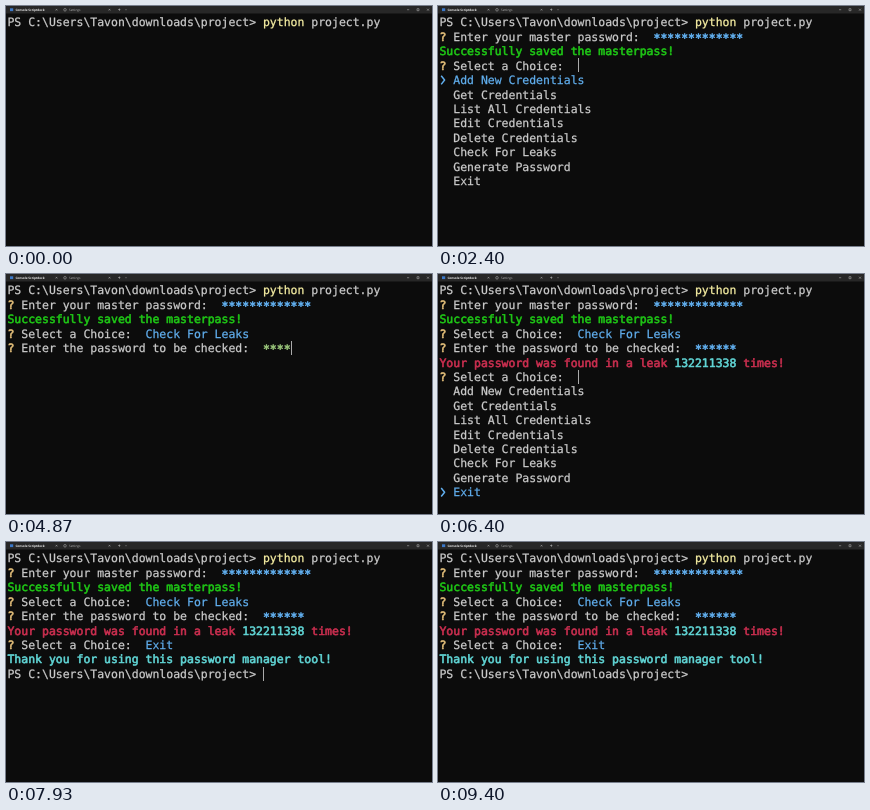
These frames come from a looping animation (426x240 px, 9.47 s). An HTML page with a canvas:

```html
<!DOCTYPE html>
<html>
<head>
<meta charset="utf-8">
<title>Password manager session</title>
<style>
  html, body { margin: 0; width: 100%; height: 100%; overflow: hidden; background: #0c0c0c; }
  canvas { display: block; width: 426px; height: 240px; }
</style>
</head>
<body>
<canvas id="stage"></canvas>
<script>
const LOOP = 9470, BLINK = 530;
const CELL = 6.905, LINE = 14.42, LEFT = 1.45, BASE = 20.4;
const MEDIUM = 0.25, BOLD = 0.6;
const WHITE = '#cccccc', YELLOW = '#f9f1a5', GOLD = '#e5c07b', BLUE = '#61afef',
      LIME = '#98c379', GREEN = '#1fc816', RED = '#cc2f50', CYAN = '#61d6d6';
const PROMPT = 'PS C:\\Users\\Tavon\\downloads\\project> ';
const MENU = ['Add New Credentials', 'Get Credentials', 'List All Credentials', 'Edit Credentials',
              'Delete Credentials', 'Check For Leaks', 'Generate Password', 'Exit'];

const canvas = document.getElementById('stage');
const ctx = canvas.getContext('2d');
const ratio = window.devicePixelRatio || 1;
canvas.width = 426 * ratio;
canvas.height = 240 * ratio;
ctx.scale(ratio, ratio);
ctx.lineJoin = 'round';
ctx.textRendering = 'geometricPrecision';

// Session times in ms; each one restarts the cursor blink.
const at = { start: 200, run: 670, ask: 1200, master: 1600, saved: 2200, menu: 2270, down: 2670,
             leaks: 3300, check: 4460, submit: 5270, result: 5800, up: 6130, exit: 7600, done: 7800 };
const MASTER_STEP = 40, DOWN_STEP = 130, CHECK_STEP = 133;
const repeat = (start, step, n) => Array.from({ length: n }, (_, i) => start + i * step);
const resets = [...Object.values(at), ...repeat(at.master, MASTER_STEP, 13),
                ...repeat(at.down, DOWN_STEP, 5), ...repeat(at.check, CHECK_STEP, 6)];

const count = (t, start, step, max) =>
  Math.max(0, Math.min(max, Math.floor((t - start) / step) + 1));

// A thin outline in the text colour sets the weight.
function write(row, col, color, text, weight = MEDIUM) {
  ctx.fillStyle = ctx.strokeStyle = color;
  ctx.lineWidth = weight;
  [...text].forEach((ch, i) => {
    const x = LEFT + (col + i) * CELL;
    const y = BASE + row * LINE + (ch === '*' ? 1 : 0);
    ctx.fillText(ch, x, y);
    ctx.strokeText(ch, x, y);
  });
}

function question(row, text, color = BLUE, answer = '') {
  write(row, 0, GOLD, '?', BOLD);
  write(row, 2, WHITE, text);
  write(row, text.length + 4, color, answer, answer[0] === '*' ? BOLD : MEDIUM);
}

function menu(row, selected) {
  question(row, 'Select a Choice:');
  MENU.forEach((item, i) => write(row + 1 + i, 2, i === selected ? BLUE : WHITE, item));
  const y = BASE - 4 + (row + 1 + selected) * LINE;
  ctx.strokeStyle = BLUE;
  ctx.lineWidth = 1.5;
  ctx.beginPath();
  ctx.moveTo(3.2, y - 4.3);
  ctx.lineTo(6.6, y);
  ctx.lineTo(3.2, y + 4.3);
  ctx.stroke();
}

function titleBar() {
  const box = (color, ...r) => { ctx.fillStyle = color; ctx.fillRect(...r); };
  const label = (text, x, weight, color) => {
    ctx.font = weight + ' 3.1px "Open Sans", sans-serif';
    ctx.fillStyle = color;
    ctx.fillText(text, x, 4.8);
  };
  const cross = (x, r) => {
    ctx.beginPath();
    ctx.moveTo(x - r, 3.7 - r); ctx.lineTo(x + r, 3.7 + r);
    ctx.moveTo(x + r, 3.7 - r); ctx.lineTo(x - r, 3.7 + r);
    ctx.stroke();
  };
  box('#272727', 0, 0, 426, 7.5);
  box('#3b78c8', 4, 2.3, 3.2, 2.8);
  label('Console Scriptdeck', 9.4, 700, '#eeeeee');
  label('Settings', 63, 400, '#bbbbbb');
  ctx.strokeStyle = '#bbbbbb';
  ctx.lineWidth = 0.5;
  ctx.beginPath();
  ctx.arc(59, 3.8, 1.3, 0, 7);
  ctx.stroke();
  cross(50.5, 0.8);
  cross(103.5, 0.8);
  cross(422, 1);
  ctx.strokeRect(411, 2.7, 2, 2);
  box('#bbbbbb', 401, 3.6, 2.2, 0.5);
  box('#bbbbbb', 112, 3.5, 2.4, 0.5);
  box('#bbbbbb', 113, 2.5, 0.5, 2.4);
  box('#999999', 119.2, 3.6, 1.6, 0.5);
}

function cursor(t, row, col) {
  const last = Math.max(...resets.filter(k => k <= t));
  if (t < at.start || (t - last) % (2 * BLINK) >= BLINK) return;
  ctx.fillStyle = '#aaaaaa';
  ctx.fillRect(Math.round(LEFT + col * CELL), Math.round(9.2 + row * LINE), 1, 14);
}

function draw(t) {
  ctx.fillStyle = '#0c0c0c';
  ctx.fillRect(0, 0, 426, 240);
  titleBar();
  ctx.font = '11.47px "DejaVu Sans Mono", monospace';

  let caret = [0, 54];
  write(0, 0, WHITE, PROMPT);
  write(0, 37, YELLOW, 'python');
  write(0, 44, WHITE, 'project.py');
  if (t >= at.run) caret = [1, 0];

  if (t >= at.ask) {
    const n = count(t, at.master, MASTER_STEP, 13);
    question(1, 'Enter your master password:', t < at.saved ? LIME : BLUE, '*'.repeat(n));
    caret = t < at.saved ? [1, 31 + n] : [2, 0];
  }
  if (t >= at.menu) {
    write(2, 0, GREEN, 'Successfully saved the masterpass!', BOLD);
    caret = [3, 20];
    if (t < at.leaks) menu(3, count(t, at.down, DOWN_STEP, 5));
  }
  if (t >= at.leaks) {
    const n = count(t, at.check, CHECK_STEP, 6);
    question(3, 'Select a Choice:', BLUE, MENU[5]);
    question(4, 'Enter the password to be checked:', t < at.submit ? LIME : BLUE, '*'.repeat(n));
    caret = t < at.submit ? [4, 37 + n] : [5, 0];
  }
  if (t >= at.result) {
    write(5, 0, RED, 'Your password was found in a leak', BOLD);
    write(5, 34, CYAN, '132211338', BOLD);
    write(5, 44, RED, 'times!', BOLD);
    caret = [6, 20];
    if (t < at.exit) menu(6, t < at.up ? 0 : 7);
  }
  if (t >= at.exit) {
    question(6, 'Select a Choice:', BLUE, MENU[7]);
    write(7, 0, CYAN, 'Thank you for using this password manager tool!', BOLD);
    caret = [8, 0];
  }
  if (t >= at.done) {
    write(8, 0, WHITE, PROMPT);
    caret = [8, 37];
  }
  cursor(t, ...caret);
}

const begin = performance.now();
function tick() {
  draw((performance.now() - begin) % LOOP);
  requestAnimationFrame(tick);
}
tick();
</script>
</body>
</html>
```
